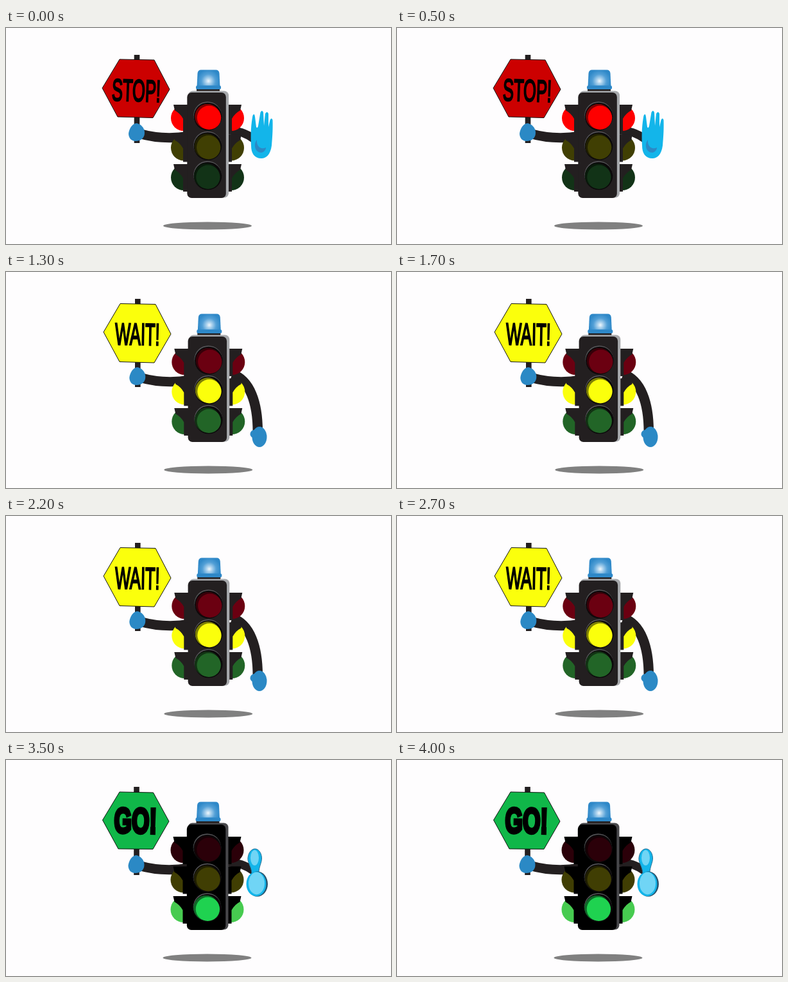
An HTML page that plays this animation: 600 by 338 pixels, repeating every 4.1 s.

```html
<!DOCTYPE html>
<html lang="en">
<head>
<meta charset="utf-8">
<title>Traffic light</title>
<style>
  html, body { margin: 0; width: 100%; height: 100%; overflow: hidden; background: #fefdfe; }
  svg { display: block; width: 600px; height: 338px; }
  text { font: 48px "Liberation Sans", Arial, sans-serif; text-anchor: middle; stroke: #000; }
  .condensed { stroke-width: 2; vector-effect: non-scaling-stroke; }
  .heavy { font-size: 55px; font-weight: bold; stroke-width: 5; }
</style>
</head>
<body>
<svg id="stage" viewBox="0 0 600 338">
  <defs>
    <radialGradient id="glow" gradientUnits="userSpaceOnUse" cx="315.500" cy="83" r="18">
      <stop offset="0" stop-color="#f0f8fd"/>
      <stop offset=".25" stop-color="#a9d0ec"/>
      <stop offset=".6" stop-color="#529fd6"/>
      <stop offset="1" stop-color="#2e88c8"/>
    </radialGradient>
  </defs>
</svg>
<script>
const LOOP = 4100;
const DARK = '#231f20';
const BLUE = '#2b89c5';
const CYAN = '#13b5ea';

const limb = (d, width) => `<path d="${d}" fill="none" stroke="${DARK}" stroke-width="${width}"/>`;
const raisedArm = limb('M345 160Q368 160 387 174', 13);
const loweredArm = limb('M351 160C379 169 391 205 391 250', 15.5);

const palm = `
  <path fill="${CYAN}" d="M382 184C381 165 382 150 384.5 137Q387 132 388 139L390 155Q392 158 393 153
    L396.5 132Q399 127 401 132L402 153L404 134Q407 129 409 134L409 155L411.5 144Q414 139 415.5 144
    C416 160 415 172 414 184C412 198 406 204 398 204C387 204 382 196 382 184Z"/>
  <path fill="${BLUE}" d="M391 175C385 182 388 195 398 195C403 194 405 190 405 187C397 191 390 185 391 175Z"/>`;

const fist = `
  <g fill="${BLUE}">
    <ellipse cx="395" cy="258" rx="11.500" ry="16"/>
    <circle cx="387" cy="253.500" r="6.500"/>
  </g>`;

const thumbUp = `
  <path fill="${CYAN}" stroke="#2a6f94" d="M383 177C382 166 376 160 377 153C378 144 383 139 388 139
    C394 139 398.500 146 398.500 154C398.500 161 394 167 394 177Z"/>
  <ellipse cx="387.500" cy="153" rx="6.500" ry="12" fill="#70d5f5"/>
  <ellipse cx="391.500" cy="194" rx="16.500" ry="19.800" fill="#28526c"/>
  <ellipse cx="390" cy="194" rx="15.500" ry="19.300" fill="${CYAN}"/>
  <ellipse cx="390.500" cy="193" rx="12.500" ry="17.500" fill="#70d5f5"/>`;

const states = [
  { until: 1300, dx: 0, word: 'STOP!', face: 'condensed', sign: '#cc0000', textAt: [202.5, 114.5, 2],
    hex: '150,94 177,49 231,50 255,96 229,140.5 174,139',
    lamps: ['#fe0000', '#403f03', '#123317'],
    front: DARK, back: '#a7a9ac', arm: raisedArm, hand: palm },
  { until: 3300, dx: 1.3, word: 'WAIT!', face: 'condensed', sign: '#fbff0c', textAt: [204.5, 114, 1],
    hex: '152,94 178,49.5 233,50.5 257,97 231,142 177,140.5',
    lamps: ['#6b0011', '#fbff0c', '#226527'],
    front: DARK, back: '#a7a9ac', arm: loweredArm, hand: fist },
  { until: LOOP, dx: -.5, word: 'GO!', face: 'heavy', sign: '#10b749', textAt: [201.5, 114, 1],
    hex: '150.5,94 177,50 229.5,51 254,96 229,139.5 175,139',
    lamps: ['#2b0009', '#403e03', '#1fd250'], sides: ['#2b0009', '#403e03', '#47cb50'],
    front: '#000', back: '#47474a', arm: raisedArm, hand: thumbUp },
];

function sideLamp(color, i, front) {
  const y = 120 + i * 46.5;
  const visor = `M261 ${y}H286V${y + 43}H276V${y + 22}Q271 ${y + 13} 263 ${y + 9}Z`;
  const half = `<circle cx="277" cy="${y + 21}" r="20" fill="${color}"/><path d="${visor}" fill="${front}"/>`;
  return `${half}<g transform="matrix(-1 0 0 1 628 0)">${half}</g>`;
}

function frontLamp(color, i) {
  const y = 140 + i * 46.5;
  const x = 316.5 - i * .8;
  return `<circle cx="314" cy="${y - 3}" r="21.800" fill="#58585b"/>
    <circle cx="314.500" cy="${y - 1.5}" r="21.800" fill="#0b090a"/>
    <circle cx="${x - 2.5}" cy="${y - 1.5}" r="19.500" fill="${color}"/>
    <circle cx="${x - 2.5}" cy="${y - 1.5}" r="19.500" fill-opacity=".5"/>
    <circle cx="${x}" cy="${y + .3}" r="18.700" fill="${color}"/>`;
}

function drawSign({ hex, sign, word, face, textAt: [x, y, tilt] }) {
  const narrow = face === 'heavy' ? .64 : .53;
  return `<polygon points="${hex}" fill="${sign}" stroke="#111"/>
    <text class="${face}" transform="translate(${x} ${y}) rotate(${tilt}) scale(${narrow} 1)">${word}</text>`;
}

function drawState(s) {
  const sides = s.sides || s.lamps;
  return `<g visibility="hidden">
    <g transform="translate(${s.dx} 0)">
      <ellipse cx="314" cy="309.500" rx="69" ry="6" fill="#808080"/>
      ${limb('M207 165Q245 176 286 169', 15)}
      <rect x="199.700" y="42" width="8.600" height="138" fill="${DARK}"/>
      <path fill="${BLUE}" d="M203 149C210 150 216 156 216 164C216 173 209 177 202 177C195 177 191 172 191 165C192 158 196 150 203 149Z"/>
    </g>
    ${drawSign(s)}
    <g transform="translate(${s.dx} 0)">
      ${s.arm}
      ${sides.map((color, i) => sideLamp(color, i, s.front)).join('')}
      <rect x="297" y="94" width="36" height="8" fill="${DARK}"/>
      <path fill="url(#glow)" d="M297.500 92L298.500 71Q299 65.500 304 65.500H327Q332 65.500 332.500 71L333.500 92Z"/>
      <rect x="296" y="90" width="39" height="6" rx="2.500" fill="#2e88c8"/>
      <rect x="284" y="98.500" width="63" height="167" rx="7" fill="${s.back}"/>
      <rect x="282.300" y="101" width="60.500" height="165" rx="7" fill="${s.front}"/>
      ${s.lamps.map(frontLamp).join('')}
    </g>
    ${s.hand}
  </g>`;
}

const stage = document.getElementById('stage');
stage.insertAdjacentHTML('beforeend', states.map(drawState).join(''));
const groups = [...stage.children].slice(1);

function render(now) {
  const t = now % LOOP;
  const active = states.findIndex(s => t < s.until);
  groups.forEach((g, i) => g.setAttribute('visibility', i === active ? 'visible' : 'hidden'));
  requestAnimationFrame(render);
}
render(0);
</script>
</body>
</html>
```
